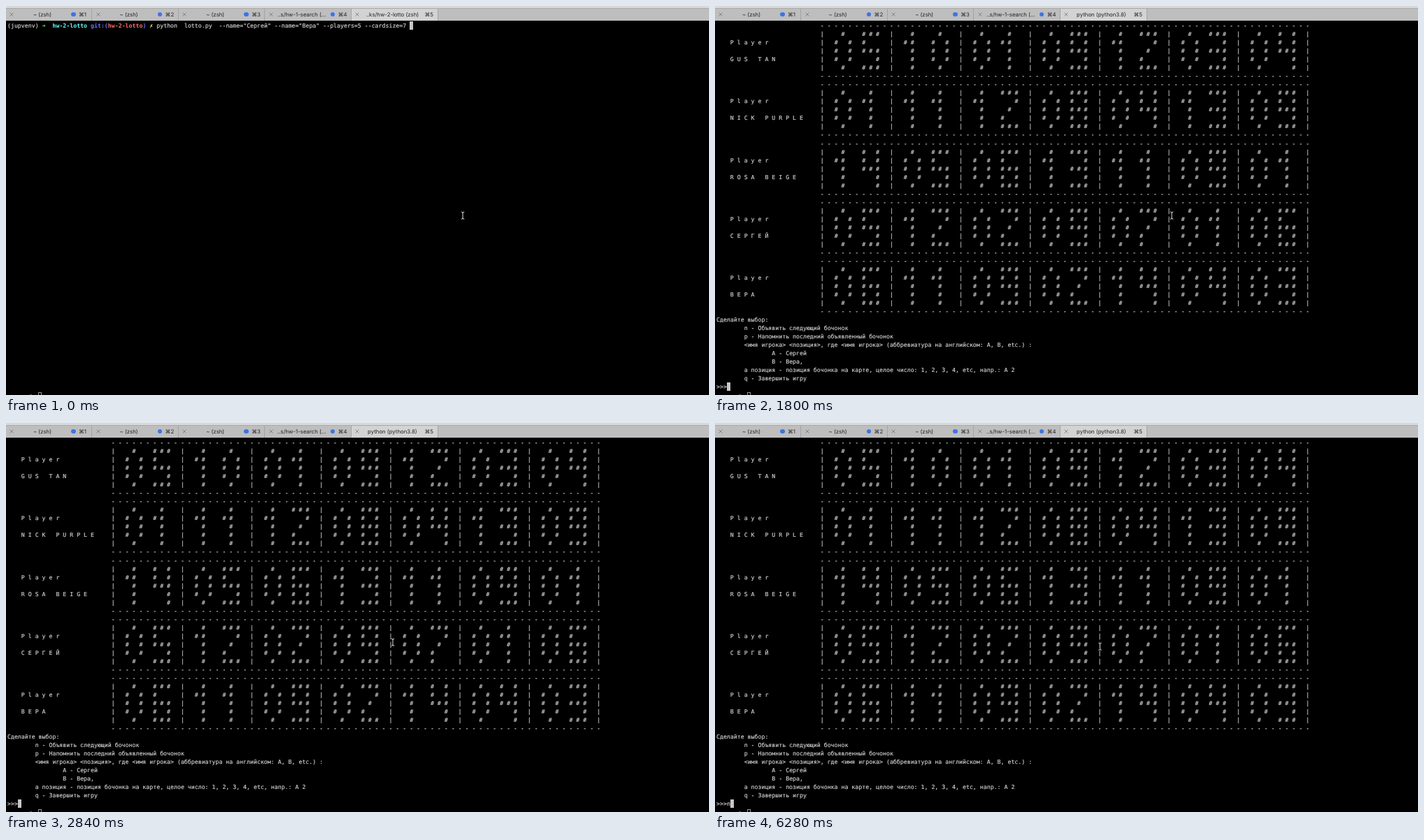
These frames come from a looping animation (1005x557 px, 8000 ms). An HTML page:

```html
<!DOCTYPE html>
<html lang="ru">
<head>
<meta charset="utf-8">
<title>Lotto in a terminal</title>
<style>
html, body { margin: 0; width: 100%; height: 100%; overflow: hidden; background: #000; }
#stage { position: relative; width: 1005px; height: 557px; overflow: hidden; background: #000; text-rendering: geometricPrecision; }
#stage * { position: absolute; white-space: pre; }

/* window chrome */
#title { left: 0; top: 0; width: 1005px; height: 3px; background: #d8d8d8; border-bottom: 1px solid #a9a9a9; overflow: hidden; }
#title span { left: 0; width: 1005px; top: -10px; text-align: center; font: 9.2px/12px Inter, sans-serif; color: #555; }
#tabs { left: 0; top: 4px; width: 1005px; height: 17px; background: #bebebe; font: 7.8px/16px Inter, sans-serif; color: #222; }
.tab { top: 0; width: 123px; height: 17px; border-right: 1px solid #a4a4a4; box-sizing: border-box; }
.tab.on { background: #d3d3d3; }
.tab span { left: 2px; width: 100px; text-align: center; }
.tab.on span { left: 8px; }
.tab .key { left: 104px; width: auto; }
.tab.on .key { left: 104px; }
.tab i { left: 93px; top: 4.7px; width: 6.6px; height: 6.6px; border-radius: 50%; background: #3d74e6; }
.tab svg { left: 5px; top: 5px; width: 6px; height: 6px; stroke: #777; stroke-width: .8; }

/* terminal */
#term { left: 2px; top: 22.1px; font: 8.24px/12.03px "DejaVu Sans Mono", monospace; color: #cfcfcf; -webkit-text-stroke: .18px; }
#term b { font-weight: bold; -webkit-text-stroke: 0; }
.block { width: 5px; height: 12px; background: #c7c7c7; }
#ghost { left: 45.5px; top: 553px; width: 3.6px; height: 10px; border: .8px solid #999; }
#speck { left: 34px; top: 556px; width: 3px; height: 1px; background: #555; }
#mouse { left: 650px; top: 294px; width: 6px; height: 12px; overflow: visible; fill: none; animation: mouse 8s step-end infinite; }

/* timeline */
.shell { animation: shell 8s step-end infinite; }
.start { animation: start 8s step-end infinite; }
.run { animation: run 8s step-end infinite; }
.game { animation: game 8s step-end infinite; }
.wait { animation: wait 8s step-end infinite; }
.typed { animation: typed 8s step-end infinite; }
@keyframes shell { 0% { visibility: visible } 13.125%, 100% { visibility: hidden } }
@keyframes start { 0% { visibility: hidden } 13.125% { visibility: visible } 22.5%, 100% { visibility: hidden } }
@keyframes run { 0% { visibility: hidden } 22.5%, 100% { visibility: visible } }
@keyframes game { 0% { visibility: hidden } 13.125%, 100% { visibility: visible } }
@keyframes wait { 0% { visibility: hidden } 13.125% { visibility: visible } 78.5%, 100% { visibility: hidden } }
@keyframes typed { 0% { visibility: hidden } 78.5%, 100% { visibility: visible } }
@keyframes mouse {
  0% { transform: translate(0, 0) }
  31.875% { transform: translate(-39px, 3.5px) }
  33.625% { transform: translate(-84px, 8px) }
  35.5% { transform: translate(-100px, 14px) }
  37.375%, 100% { transform: translate(-102.5px, 20px) }
}
</style>
</head>
<body>
<div id="stage">
  <div id="title">
    <span class="shell">5. ~/projects/python/homeworks/hw-2-lotto (zsh) - python lotto.py --players=5 --cardsize=7 --type=game</span>
    <span class="start">5. python lotto.py --players=5 --cardsize=7 python (zsh)</span>
    <span class="run">5. python lotto.py --players=5 python (python3.8)</span>
  </div>
  <div id="tabs"></div>
  <div id="term"></div>
  <div id="ghost"></div>
  <div id="speck"></div>
  <svg id="mouse" viewBox="0 0 6 12">
    <path d="M.8 .8Q3 .8 3 2.4Q3 .8 5.2 .8M3 2V10M.8 11.2Q3 11.2 3 9.6Q3 11.2 5.2 11.2" stroke="#000" stroke-width="2"/>
    <path d="M.8 .8Q3 .8 3 2.4Q3 .8 5.2 .8M3 2V10M.8 11.2Q3 11.2 3 9.6Q3 11.2 5.2 11.2" stroke="#ddd" stroke-width="1"/>
  </svg>
</div>
<script>
const CELL = 4.96, ROW = 12.03;
const term = document.getElementById('term');
const tabs = document.getElementById('tabs');

function add(parent, tag, cls, text = '') {
  const el = document.createElement(tag);
  el.className = cls;
  el.textContent = text;
  return parent.appendChild(el);
}

function put(row, col, text, cls, color) {
  const el = add(term, color ? 'b' : 'span', cls, text);
  el.style.left = col * CELL + 'px';
  el.style.top = row * ROW + 'px';
  if (color) el.style.color = color;
  return el;
}

// Tabs
['~ (zsh)', '~ (zsh)', '~ (zsh)', '..s/hw-1-search (...', ''].forEach((label, i) => {
  const active = i === 4;
  const tab = add(tabs, 'div', active ? 'tab on' : 'tab');
  tab.style.left = i * 123.6 + 'px';
  if (active) tab.style.width = '124px';
  tab.innerHTML = '<svg viewBox="0 0 6 6"><path d="M.5 .5L5.5 5.5M5.5 .5L.5 5.5"/></svg>';
  if (active) {
    add(tab, 'span', 'shell', '..ks/hw-2-lotto (zsh)');
    add(tab, 'span', 'start', 'python (zsh)');
    add(tab, 'span', 'run', 'python (python3.8)');
  } else {
    add(tab, 'span', '', label);
    add(tab, 'i', '');
  }
  add(tab, 'span', 'key', '⌘' + (i + 1));
});

// Shell prompt
put(0, 0, '(jupvenv)', 'shell');
put(0, 10, '➜', 'shell', '#5ffa68');
put(0, 13, 'hw-2-lotto', 'shell', '#60fdff');
put(0, 24, 'git:(', 'shell', '#6871ff');
put(0, 29, 'hw-2-lotto', 'shell', '#ff6e67');
put(0, 39, ')', 'shell', '#6871ff');
put(0, 41, '✗', 'shell', '#fffc67');
put(0, 43, 'python  lotto.py  --name="Сергей" --name="Вера" --players=5 --cardsize=7', 'shell');
put(0, 116, '', 'block shell');

// Digits as five rows of three
const DIGITS = [
  ' # |# #|# #|# #| # ', ' # |## | # | # | # ', '###|  #| # |#  |###',
  '###|  #|###|  #|###', '# #|# #|###|  #|  #', '###|#  |###|  #|###',
  '###|#  |###|# #|###', '###|  #| # |#  |#  ', '###|# #|###|# #|###',
  '###|# #|###|  #|###'
].map(d => d.split('|'));

const CARDS = [
  ['GUS TAN', '05 10 01 09 12 03 04'],
  ['NICK PURPLE', '01 11 12 08 04 13 09'],
  ['ROSA BEIGE', '14 05 06 13 11 09 01'],
  ['СЕРГЕЙ', '05 12 02 09 07 01 06'],
  ['ВЕРА', '06 11 09 02 14 04 03']
];
const spaced = s => [...s].join(' ');

CARDS.forEach(([name, numbers], c) => {
  const top = c * 7;
  const rule = spaced('-'.repeat(71));
  put(top, 30, rule, 'game');
  put(top + 6, 30, rule, 'game');
  put(top + 2, 4, spaced('Player'), 'game');
  put(top + 4, 4, spaced(name), 'game');
  for (let r = 0; r < 5; r++) {
    const cells = numbers.split(' ').map(n => ` ${DIGITS[n[0]][r]} ${DIGITS[n[1]][r]} `);
    put(top + 1 + r, 30, spaced('|' + cells.join('|') + '|'), 'game');
  }
});

// Menu
[
  [0, 'Сделайте выбор:'],
  [8, 'n - Объявить следующий бочонок'],
  [8, 'p - Напомнить последний объявленный бочонок'],
  [8, '<имя игрока> <позиция>, где <имя игрока> (аббревиатура на английском: A, B, etc.) :'],
  [16, 'A - Сергей'],
  [16, 'B - Вера,'],
  [8, 'а позиция - позиция бочонка на карте, целое число: 1, 2, 3, 4, etc, напр.: A 2'],
  [8, 'q - Завершить игру'],
  [0, '>>>']
].forEach(([col, text], i) => put(35 + i, col, text, 'game'));

put(43, 3, '', 'block wait');
put(43, 3, 'n', 'typed');
put(43, 4, '', 'block typed');
</script>
</body>
</html>
```
